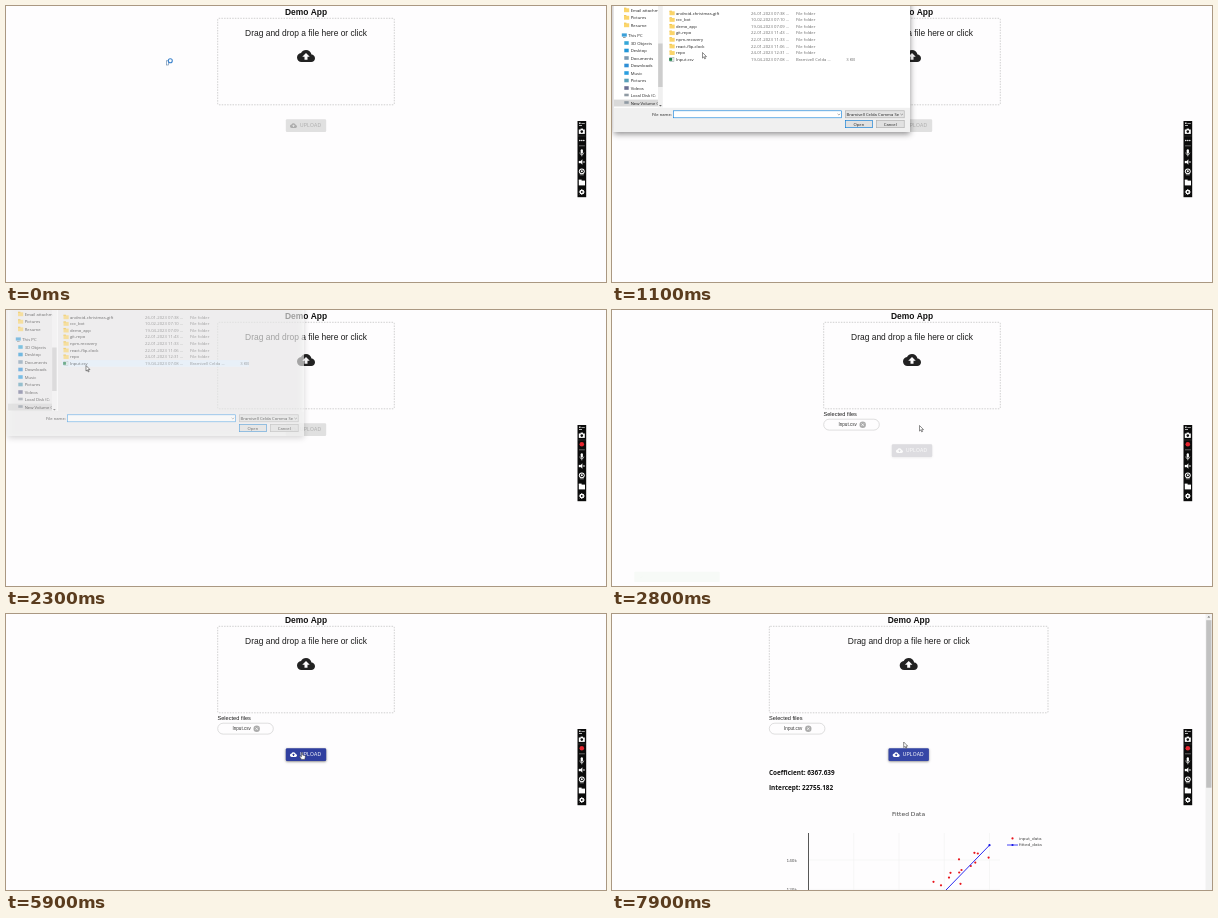
An HTML page with a canvas that plays this animation: 600 by 276 pixels, repeating every 8 s.

```html
<!DOCTYPE html>
<html lang="en">
<head>
<meta charset="utf-8">
<title>Demo App</title>
<style>
html, body { margin: 0; width: 100%; height: 100%; overflow: hidden; background: #fefdfe; }
canvas { display: block; width: 600px; height: 276px; }
</style>
</head>
<body>
<canvas id="stage"></canvas>
<script>
const W = 600, H = 276, LOOP = 8000, STEP = 100;
const canvas = document.getElementById('stage');
const dpr = Math.max(1, window.devicePixelRatio || 1);
canvas.width = W * dpr;
canvas.height = H * dpr;
const ctx = canvas.getContext('2d');

const SANS = '"Liberation Sans", Arial, sans-serif';
const UI = '"Open Sans", "Noto Sans", sans-serif';
const PLOT = '"DejaVu Sans", Verdana, sans-serif';
const CLOUD = new Path2D('M19.35 10.04C18.67 6.59 15.64 4 12 4 9.11 4 6.6 5.64 5.35 8.04 2.34 8.36 0 10.91 0 14c0 3.31 2.69 6 6 6h13c2.76 0 5-2.24 5-5 0-2.64-2.05-4.78-4.65-4.96zM14 13v4h-4v-4H7l5-5 5 5h-3z');
const ARROW = new Path2D('M0 0V5.6L1.3 4.4 2.2 6.4 3.1 6 2.2 4.1H4Z');
const HAND = new Path2D('M-.6 0Q0-.7.6 0V2.3L3 2.9Q3.6 3.1 3.4 4L2.8 6.6H-.5L-2.4 3.9Q-2.3 3-1.4 3.4L-.6 4Z');

// Text is laid out large and scaled down to keep fractional advances.
const BIG = 8;
function text(s, x, y, size, o = {}) {
  ctx.save();
  ctx.translate(x, y + size * 0.36);
  ctx.scale(1 / BIG, 1 / BIG);
  ctx.font = `${o.bold ? 'bold ' : ''}${size * BIG}px ${o.font || SANS}`;
  ctx.textAlign = o.align || 'left';
  ctx.letterSpacing = (o.spacing || 0) * BIG + 'px';
  ctx.fillStyle = o.color || '#1c1c1c';
  ctx.fillText(s, 0, 0);
  ctx.restore();
}

function rect(x, y, w, h, color, border) {
  ctx.fillStyle = color;
  ctx.fillRect(x, y, w, h);
  if (border) {
    ctx.strokeStyle = border;
    ctx.lineWidth = 0.6;
    ctx.strokeRect(x + 0.3, y + 0.3, w - 0.6, h - 0.6);
  }
}

function round(x, y, w, h, r) {
  ctx.beginPath();
  ctx.roundRect(x, y, w, h, r);
}

function dot(x, y, r, color) {
  ctx.fillStyle = color;
  ctx.beginPath();
  ctx.arc(x, y, r, 0, 7);
  ctx.fill();
}

function line(points, color, width) {
  ctx.strokeStyle = color;
  ctx.lineWidth = width;
  ctx.beginPath();
  points.forEach(([x, y]) => ctx.lineTo(x, y));
  ctx.stroke();
}

function cross(x, y, r, color, width) {
  line([[x - r, y - r], [x + r, y + r]], color, width);
  line([[x - r, y + r], [x + r, y - r]], color, width);
}

function shadow(alpha, blur, dy) {
  ctx.shadowColor = `rgba(0,0,0,${alpha})`;
  ctx.shadowBlur = blur * dpr;
  ctx.shadowOffsetY = dy * dpr;
}

function cloud(cx, cy, width, color) {
  ctx.save();
  ctx.translate(cx - width / 2, cy - width / 2);
  ctx.scale(width / 24, width / 24);
  ctx.fillStyle = color;
  ctx.fill(CLOUD);
  ctx.restore();
}

// Linear interpolation through [time, ...values] keys.
function track(keys, t) {
  if (t <= keys[0][0]) return keys[0].slice(1);
  for (let i = 1; i < keys.length; i++) {
    const a = keys[i - 1], b = keys[i];
    if (t < b[0]) {
      const k = (t - a[0]) / (b[0] - a[0]);
      return a.slice(1).map((v, j) => v + (b[j + 1] - v) * k);
    }
  }
  return keys[keys.length - 1].slice(1);
}

function dropZone(left, right, cx) {
  text('Demo App', cx, 5.5, 8.43, { bold: true, align: 'center', color: '#111' });
  ctx.save();
  ctx.setLineDash([1.5, 1.2]);
  ctx.strokeStyle = '#bdbdbd';
  ctx.lineWidth = 0.7;
  round(left, 12.3, right - left, 86.5, 1);
  ctx.stroke();
  ctx.restore();
  text('Drag and drop a file here or click', cx, 26.6, 8.43, { align: 'center' });
  cloud(cx, 50, 18, '#222');
}

function selectedFile(x) {
  text('Selected files', x, 103.8, 5.62);
  ctx.strokeStyle = '#c8c8c8';
  ctx.lineWidth = 0.6;
  round(x + 0.2, 109.2, 55.6, 10.9, 5.45);
  ctx.stroke();
  text('Input.csv', x + 15, 114.6, 4.57, { color: '#333' });
  dot(x + 39.2, 114.7, 3.2, '#acacac');
  cross(x + 39.2, 114.7, 1.2, '#fff', 0.7);
}

const BUTTON = {
  off: { bg: '#e0e0e0', fg: '#adadad', lift: 0 },
  fading: { bg: '#dddce0', fg: '#fbfbfb', lift: 0.08 },
  half: { bg: '#8790c8', fg: '#fff', lift: 0.2 },
  on: { bg: '#3f51b5', fg: '#fff', lift: 0.35 },
  hover: { bg: '#303f9f', fg: '#fff', lift: 0.5 },
  leave: { bg: '#3546a6', fg: '#fff', lift: 0.45 }
};

function button(cx, y, state) {
  const b = BUTTON[state];
  ctx.save();
  if (b.lift) shadow(b.lift, 2.4, 0.8);
  ctx.fillStyle = b.bg;
  round(cx - 20.2, y, 40.4, 12.8, 1.3);
  ctx.fill();
  ctx.restore();
  cloud(cx - 12.5, y + 6.4, 7, b.fg);
  text('UPLOAD', cx - 6, y + 6.4, 4.92, { color: b.fg, spacing: 0.14 });
}

function toast(scale, alpha) {
  ctx.save();
  ctx.globalAlpha = alpha;
  ctx.translate(65, 267);
  ctx.scale(scale, scale * scale);
  ctx.translate(-65, -267);
  ctx.save();
  shadow(0.3 * alpha, 3, 1);
  ctx.fillStyle = '#4caf50';
  round(8, 257.5, 114, 18.3, 1.4);
  ctx.fill();
  ctx.restore();
  dot(17.2, 267, 2.9, '#fff');
  line([[15.8, 267.1], [16.8, 268.1], [18.8, 266]], '#4caf50', 0.7);
  text('File Input.csv successfully added', 23.5, 267, 4.92, { color: '#fff', spacing: 0.053 });
  cross(111, 267, 1.6, '#fff', 0.6);
  ctx.restore();
}

function results() {
  text('Coefficient: 6367.639', 157, 158.3, 6.4, { bold: true, font: UI, color: '#111' });
  text('Intercept: 22755.182', 157, 173.6, 6.4, { bold: true, font: UI, color: '#111' });
  text('Fitted Data', 296.6, 199.6, 5.98, { font: PLOT, align: 'center', color: '#444' });

  const px = v => 196.5 + v * 9.05;
  const py = v => 246 - (v - 140000) / 20000 * 29.3;
  const fit = v => py(22755.182 + 6367.639 * v);
  for (const v of [5, 10, 15, 20]) line([[px(v), 219], [px(v), H]], '#eee', 0.5);
  for (const v of [140, 120]) {
    line([[196.5, py(v * 1000)], [388, py(v * 1000)]], '#eee', 0.5);
    text(v + 'k', 185, py(v * 1000), 4.22, { font: PLOT, align: 'right', color: '#555' });
  }
  line([[196.5, 219], [196.5, H]], '#444', 0.9);

  const points = [[321.5, 267.8], [329, 271.3], [337, 263.6], [338.5, 258.8], [347, 245.3],
    [347.2, 258.5], [349.5, 256], [348.5, 269.8], [358.8, 252], [363.3, 248.6],
    [362.4, 238.8], [365.8, 239.5], [376.6, 243.6]];
  points.forEach(([x, y]) => dot(x, y, 1.1, '#e8141c'));
  line([[px(13), fit(13)], [px(20), fit(20)]], '#1414f0', 0.9);
  dot(px(20), fit(20), 1.1, '#1414e6');

  dot(400.5, 224.4, 1.1, '#e8141c');
  line([[395, 231], [406, 231]], '#1414f0', 0.8);
  dot(400.5, 231, 1.1, '#1414e6');
  text('input_data', 407, 224.3, 4.22, { font: PLOT, color: '#444' });
  text('fitted_data', 407, 230.8, 4.22, { font: PLOT, color: '#444' });

  rect(593.5, 0, 6.5, H, '#f1f1f1');
  rect(594.2, 6.2, 5.2, 167.5, '#c1c1c1');
  triangle(596.8, 2.8, -1, '#666');
}

function triangle(x, y, dir, color) {
  ctx.fillStyle = color;
  ctx.beginPath();
  ctx.moveTo(x - 1.4, y - dir * 0.7);
  ctx.lineTo(x + 1.4, y - dir * 0.7);
  ctx.lineTo(x, y + dir * 0.8);
  ctx.fill();
}

const FOLDERS = [
  ['android-christmas-gift', '26-01-2023 07:38'],
  ['ccc_bot', '10-02-2023 07:10'],
  ['demo_app', '19-04-2023 07:09'],
  ['git-repo', '22-01-2023 11:43'],
  ['npm-recovery', '22-01-2023 11:33'],
  ['react-flip-clock', '22-01-2023 11:06'],
  ['repo', '24-01-2023 12:31'],
  ['Input.csv', '19-04-2023 07:08']
];
const PLACES = [
  ['3D Objects', '#35a7d8'], ['Desktop', '#2196d8'], ['Documents', '#7d99b0'],
  ['Downloads', '#2f8fd6'], ['Music', '#2a9fe0'], ['Pictures', '#5aa0b8'],
  ['Videos', '#6b6f92'], ['Local Disk (C:', '#8f9aa3'], ['New Volume (', '#8f9aa3']
];

function label(s, x, y, color = '#222', align = 'left') {
  text(s, x, y, 4.2, { font: UI, color, align });
}

function folder(x, y) {
  rect(x, y - 2.3, 2.4, 1.2, '#e8b93c');
  rect(x, y - 1.7, 5.2, 3.9, '#fbd56b');
}

function navigation() {
  ['Email attachm', 'Pictures', 'Resume'].forEach((s, i) => {
    folder(12, 4 + i * 7.5);
    label(s, 18.7, 4 + i * 7.5);
  });
  rect(9.8, 27.4, 5, 3.2, '#3b9fd8');
  rect(11, 31.1, 2.6, 0.7, '#777');
  label('This PC', 16.3, 29.4);
  rect(2, 93.6, 44, 6.9, '#d9d9d9');
  PLACES.forEach(([s, color], i) => {
    const y = 37 + i * 7.5;
    rect(12.3, y - 1.8, 4.4, i > 6 ? 2.6 : 3.6, color);
    label(s, 18.7, y);
  });
}

function fileList(hover) {
  if (hover) rect(56, 50.1, 187, 6.6, '#e5f3ff');
  FOLDERS.forEach(([name, date], i) => {
    const y = 7 + i * 6.63, last = i === FOLDERS.length - 1;
    if (last) {
      rect(57.6, y - 2.4, 4.6, 4.8, '#fff', '#9aa');
      rect(57.2, y - 1.4, 3, 2.8, '#21804a');
    } else folder(57.5, y);
    label(name, 64, y);
    label(date + ' ...', 139, y, '#6d6d6d');
    label(last ? 'Bramivell Celda ...' : 'File folder', 184, y, '#6d6d6d');
  });
  label('3 KB', 243, 53.4, '#6d6d6d', 'right');
}

function dialog(t) {
  const loaded = t >= 1000;
  const [alpha] = track([[0, 0], [100, 0.5], [200, 1], [2200, 1], [2300, 0.6], [2400, 0.2], [2500, 0]], t);
  if (!alpha) return;
  ctx.save();
  ctx.globalAlpha = alpha;
  ctx.save();
  shadow(0.45 * alpha, 6, 1.5);
  rect(1.5, -12, 296.5, 138, '#fff');
  ctx.restore();
  ctx.beginPath();
  ctx.rect(1.5, 0, 296.5, 126);
  ctx.clip();

  if (loaded) {
    navigation();
    rect(46, 0, 6, 101, '#fff');
    fileList(t >= 1500);
  }
  rect(46, 0, 4.8, 101.5, '#f0f0f0');
  rect(46.2, 37.5, 4.4, 43.5, '#cdcdcd');
  triangle(48.4, 99.6, 1, '#606060');

  rect(1.5, 101.8, 296.5, 24.5, '#f0f0f0');
  if (loaded) {
    label('File name:', 60, 108.4, '#222', 'right');
    rect(61, 104.5, 168.8, 7.6, '#fff', '#0078d7');
    line([[225.6, 107.8], [226.9, 109], [228.2, 107.8]], '#555', 0.5);
    rect(233, 104.5, 59.5, 7.6, '#e4e4e4', '#adadad');
    ctx.save();
    ctx.beginPath();
    ctx.rect(234, 104.5, 53, 7.6);
    ctx.clip();
    label('Bramivell Celda Comma Separa', 234.6, 108.3);
    ctx.restore();
    line([[288.4, 107.8], [289.7, 109], [291, 107.8]], '#555', 0.5);
    rect(233, 114, 27.8, 8, '#e1e1e1', '#0078d7');
    rect(264, 114, 28.5, 8, '#e1e1e1', '#adadad');
    label('Open', 246.9, 118, '#222', 'center');
    label('Cancel', 278.3, 118, '#222', 'center');
  } else {
    rect(43, 106, 17, 5, '#fff');
    rect(61.5, 104.7, 168, 7.4, '#fff');
    rect(233, 104.7, 59, 7.2, '#fafafa');
    rect(233, 114, 28, 8, '#fdfdfd');
    rect(264, 114, 28.3, 8, '#fdfdfd');
  }
  ctx.restore();
}

function gear(x, y) {
  for (let i = 0; i < 8; i++) {
    const a = i * Math.PI / 4;
    line([[x, y], [x + Math.cos(a) * 2.9, y + Math.sin(a) * 2.9]], '#fff', 1);
  }
  dot(x, y, 2.2, '#fff');
  dot(x, y, 0.9, '#0b0b0b');
}

function recorder(t) {
  const x = 575.8;
  rect(571.5, 115, 8.7, 76.2, '#0b0b0b');
  rect(573, 116.6, 1.6, 1.2, '#fff');
  rect(575.4, 117.2, 3.4, 0.7, '#ddd');
  rect(573, 119, 3, 0.8, '#ddd');
  // camera
  rect(x - 1.2, 122.6, 2.4, 1.4, '#fff');
  rect(x - 3, 123.5, 6, 4.4, '#fff');
  dot(x, 125.6, 1.3, '#0b0b0b');
  rect(572, 129.8, 7.7, 0.4, '#555');
  // recording state
  if (t < 1500) [-2, 0, 2].forEach(d => dot(x + d, 134.4, 0.75, '#fff'));
  else if (t < 2300) {
    dot(x, 134.3, 2.6, '#8d8d8d');
    dot(x, 134.3, 1.7, '#e6e6e6');
  } else dot(x, 134.3, 2.3, '#e5252f');
  rect(573, 139.5, 5.8, 0.7, '#8a8a8a');
  // microphone
  round(x - 1.1, 143.2, 2.2, 4.6, 1.1);
  ctx.fillStyle = '#fff';
  ctx.fill();
  line([[x - 2.1, 146.6], [x - 1.2, 148.5], [x + 1.2, 148.5], [x + 2.1, 146.6]], '#fff', 0.6);
  line([[x, 148.5], [x, 150.3]], '#fff', 0.8);
  // speaker
  rect(x - 3, 154.9, 2, 2.3, '#fff');
  ctx.beginPath();
  ctx.moveTo(x - 2, 156);
  ctx.lineTo(x + 0.6, 153.3);
  ctx.lineTo(x + 0.6, 158.8);
  ctx.fill();
  cross(x + 2.1, 156, 0.8, '#fff', 0.6);
  // webcam
  dot(x, 165.3, 2.9, '#fff');
  dot(x, 165.3, 1.9, '#0b0b0b');
  dot(x, 165.3, 1, '#fff');
  line([[x - 2, 168.8], [x + 2, 168.8]], '#ddd', 0.6);
  // folder
  rect(x - 3, 173.6, 2.8, 1.4, '#fff');
  rect(x - 3, 174.6, 6.2, 4.8, '#fff');
  gear(x, 186);
}

const CURSOR = [[0, 161, 54], [100, 150, 53], [700, 90.5, 46.5], [1400, 90.5, 46.5],
  [1600, 80, 55.5], [2600, 80, 55.5], [2700, 215, 92], [2800, 307.5, 115.5],
  [3000, 307.5, 115.5], [3600, 302, 127], [5800, 302, 127], [5900, 296, 138.8],
  [7800, 296, 138.8], [7900, 291.7, 128]];

function cursor(t) {
  const [x, y] = track(CURSOR, t);
  if (t < 100) {
    rect(160, 54.5, 2.7, 4.8, '#fff', '#5a7fa8');
    ctx.strokeStyle = '#3c83cc';
    ctx.lineWidth = 1.1;
    ctx.beginPath();
    ctx.arc(164.3, 54.8, 2, 0, 7);
    ctx.stroke();
    return;
  }
  const shape = t >= 5900 && t < 7900 ? HAND : ARROW;
  ctx.save();
  ctx.translate(x, y);
  ctx.fillStyle = '#fff';
  ctx.strokeStyle = '#333';
  ctx.lineWidth = 0.55;
  ctx.fill(shape);
  ctx.stroke(shape);
  ctx.restore();
}

function buttonState(t) {
  if (t < 2800) return 'off';
  if (t < 3000) return 'fading';
  if (t < 3100) return 'half';
  if (t < 5900) return 'on';
  return t < 7900 ? 'hover' : 'leave';
}

function draw(t) {
  ctx.setTransform(dpr, 0, 0, dpr, 0, 0);
  rect(0, 0, W, H, '#fefdfe');
  const added = t >= 2700, done = t >= 7100;
  const cx = done ? 296.7 : 300;
  const left = done ? 157.3 : 211.7;
  dropZone(left, done ? 436 : 388.3, cx);
  if (added) selectedFile(left - 0.2);
  button(cx, added ? 134.2 : 113.2, buttonState(t));
  if (done) results();
  if (t >= 2800 && t < 5900) {
    const [scale, alpha] = track([[2800, 0.75, 0.04], [2900, 0.75, 0.04], [3000, 0.93, 0.65], [3100, 1, 1]], t);
    toast(scale, alpha);
  }
  dialog(t);
  recorder(t);
  cursor(t);
}

const start = performance.now();
function tick() {
  const t = (performance.now() - start) % LOOP;
  draw(Math.floor(t / STEP) * STEP);
  requestAnimationFrame(tick);
}
tick();
</script>
</body>
</html>
```
